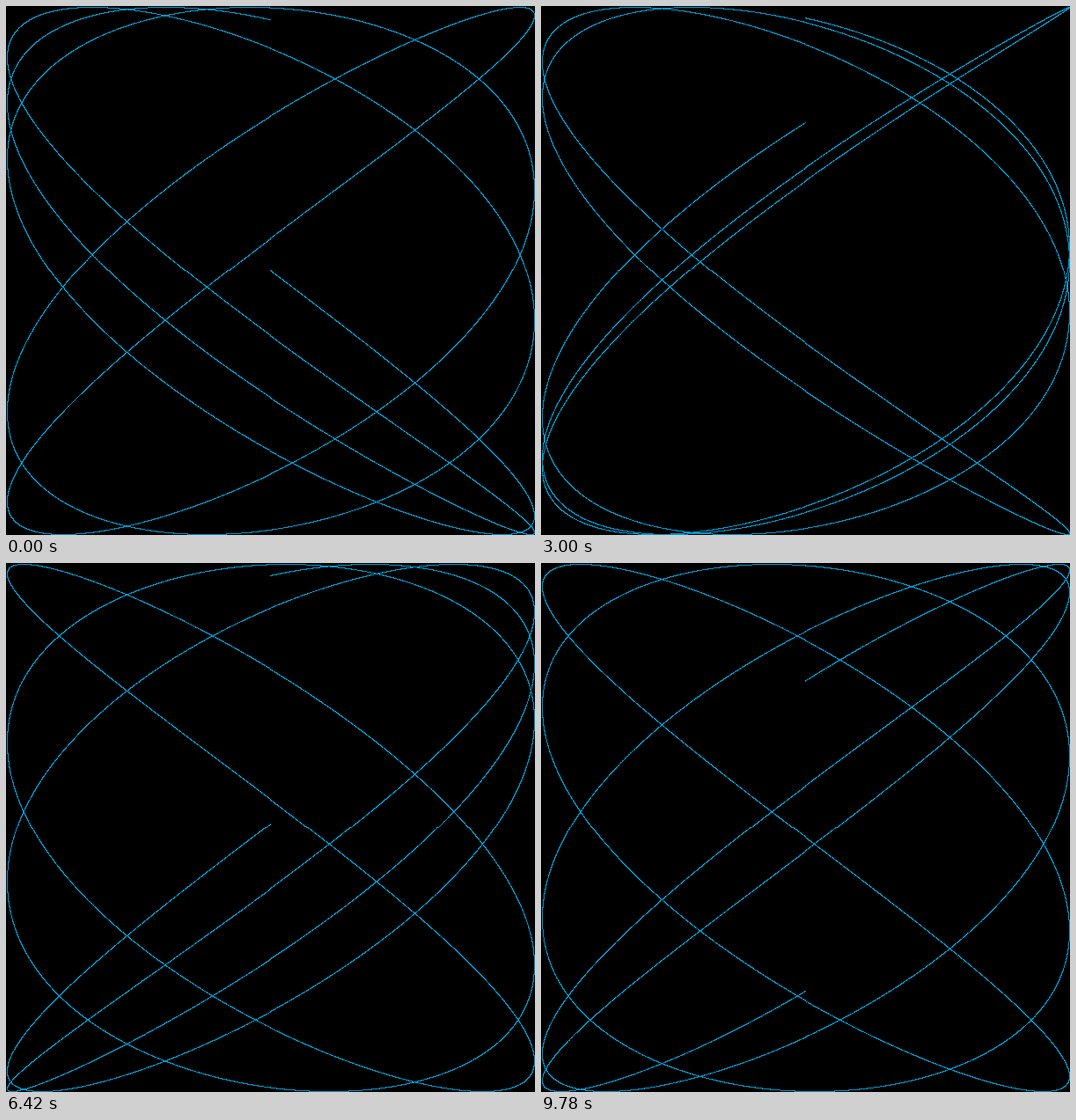
These frames come from a looping animation (601 by 601 pixels, 9840 ms). An HTML page with a canvas:

```html
<!DOCTYPE html>
<html lang="en">
<head>
<meta charset="utf-8">
<title>Lissajous</title>
<style>
  html, body { margin: 0; width: 100%; height: 100%; overflow: hidden; background: #000; }
  canvas { display: block; width: 601px; height: 601px; }
</style>
</head>
<body>
<canvas id="stage" width="601" height="601"></canvas>
<script>
  const RADIUS = 300, SIZE = 2 * RADIUS + 1;
  const CYCLES = 5, STEP = 0.001;
  const FREQ = 0.75995, PHASE_STEP = 0.1;
  const FRAMES = 164, DELAY = 60;
  const LINE = [0, 153, 204];

  const ctx = document.getElementById('stage').getContext('2d');
  const image = ctx.createImageData(SIZE, SIZE);
  const black = new Uint8ClampedArray(image.data.length);
  for (let i = 3; i < black.length; i += 4) black[i] = 255;

  // Truncates toward zero, so negative values sit one pixel further in.
  const toPixel = v => RADIUS + Math.trunc(v * RADIUS + 0.5);

  function draw(phase) {
    const data = image.data;
    data.set(black);
    for (let t = 0; t < CYCLES * 2 * Math.PI; t += STEP) {
      const x = toPixel(Math.sin(t));
      const y = toPixel(Math.sin(t * FREQ + phase));
      data.set(LINE, (y * SIZE + x) * 4);
    }
    ctx.putImageData(image, 0, 0);
  }

  let shown = -1;
  function tick() {
    const frame = Math.floor(performance.now() / DELAY) % FRAMES;
    if (frame !== shown) {
      shown = frame;
      draw(frame * PHASE_STEP);
    }
    requestAnimationFrame(tick);
  }
  tick();
</script>
</body>
</html>
```
